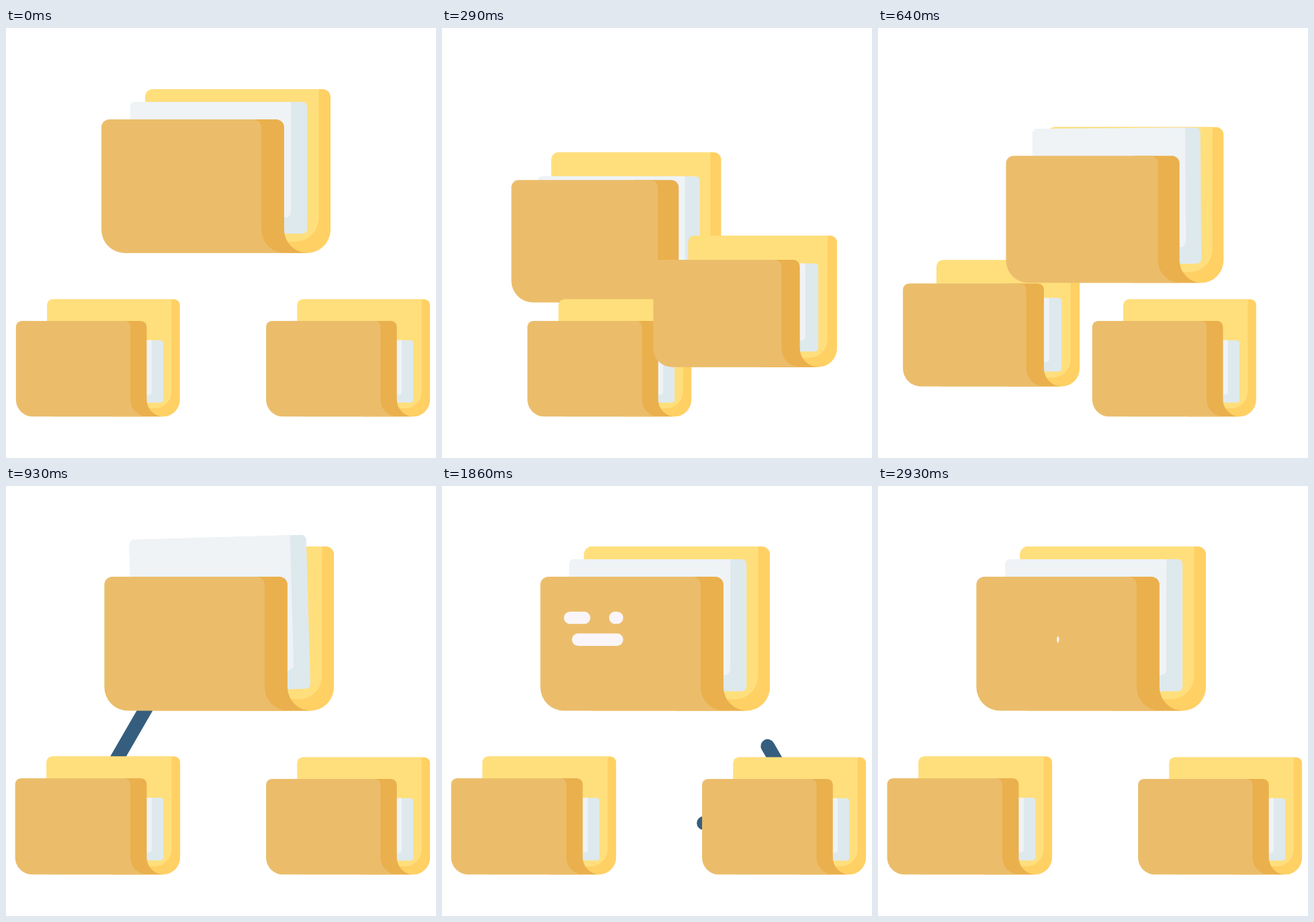
Recreate the animation shown at these times as an HTML page with a canvas. Size 640 by 640 pixels, loop 3 s.

```html
<!DOCTYPE html>
<html lang="en">
<head>
<meta charset="utf-8">
<title>Folders sharing files</title>
<style>
  html, body { margin: 0; height: 100%; overflow: hidden; background: #fff; }
  canvas { display: block; width: 640px; height: 640px; }
</style>
</head>
<body>
<canvas id="stage" width="640" height="640"></canvas>
<script>
const ctx = document.getElementById('stage').getContext('2d');
const LOOP = 3000;
const STEP = LOOP / 42;

const clamp = u => Math.min(1, Math.max(0, u));
const mix = (a, b, u) => a + (b - a) * u;
const smooth = u => u * u * (3 - 2 * u);
const eased = (t, start, duration) => smooth(clamp((t - start) / duration));

function box(color, x, y, right, bottom, radii) {
  ctx.fillStyle = color;
  ctx.beginPath();
  ctx.roundRect(x, y, right - x, bottom - y, radii);
  ctx.fill();
}

function shape(color, path) {
  ctx.fillStyle = color;
  ctx.fill(new Path2D(path));
}

// Folder artwork is 341 by 244 units; the sheet stretches from its bottom edge.
function drawFolder({ x, y, scale, stretch, tilt = 0 }) {
  ctx.save();
  ctx.translate(x, y);
  ctx.scale(scale, scale);
  box('#ffd064', 65, 0, 341, 244, [12, 12, 35, 12]);
  box('#ffdf7c', 65, 0, 323.5, 227, [12, 0, 35, 0]);

  ctx.save();
  ctx.translate(174.7, 215);
  ctx.rotate(-tilt * Math.PI / 180);
  ctx.scale(1, stretch);
  box('#dee9ee', -131.5, -196, 131.5, 0, 7);
  box('#eff3f6', -131.5, -196, 107.5, -24, [7, 0, 8, 7]);
  ctx.restore();

  shape('#eab04d', 'M226 45H260A12 12 0 0 1 272 57V209A35 35 0 0 0 307 244H200V45Z');
  shape('#ebbd6b', 'M12 45H226A12 12 0 0 1 238 57V209A35 35 0 0 0 273 244H35A35 35 0 0 1 0 209V57A12 12 0 0 1 12 45Z');
  ctx.restore();
}

// Pulses run clockwise round the triangle that joins the three folders.
const SIDE = 441;
const PULSE = 294;

function drawPulse(t, start) {
  const head = eased(t, start, 1000) * (3 * SIDE + PULSE);
  const tail = head - PULSE;
  if (head <= 0 || tail >= 3 * SIDE) return;
  ctx.setLineDash([PULSE, 5000]);
  ctx.lineDashOffset = -tail;
  ctx.beginPath();
  ctx.moveTo(109.6, 501.8);
  ctx.lineTo(330.3, 120);
  ctx.lineTo(551, 501.8);
  ctx.lineTo(109.6, 501.8);
  ctx.stroke();
}

// A long pill slides through a pill-shaped window.
function drawTextRow(t, y, pills) {
  ctx.save();
  ctx.beginPath();
  ctx.roundRect(181.5, y, 88.2, 18.6, 9.3);
  ctx.clip();
  for (const [start, duration] of pills) {
    const x = mix(71, 270, eased(t, start, duration));
    box('#faf5f9', x, y, x + 110, y + 18.6, 9.3);
  }
  ctx.restore();
}

function travel(from, to, p) {
  const pose = {};
  for (const key in from) pose[key] = mix(from[key], to[key], p);
  return pose;
}

const SMALL = 0.7155, SHORT = 0.662;
const START_TOP = { x: 142, y: 91, scale: 1, stretch: 1 };
const START_LEFT = { x: 14.8, y: 403.7, scale: SMALL, stretch: SHORT };
const START_RIGHT = { x: 387.1, y: 403.7, scale: SMALL, stretch: SHORT };
const END_TOP = { x: 146.4, y: 90, scale: 1.002, stretch: 1 };
const END_LEFT = { x: 13.6, y: 402.5, scale: 0.72, stretch: SHORT };

function popSheet(t) {
  const PEAK = 857;
  if (t < PEAK) return {
    stretch: mix(SHORT, 1.25, (t / PEAK) ** 1.12),
    tilt: 2.45 * clamp((t - 490) / (PEAK - 490)) ** 2
  };
  const rest = clamp(1 - (t - PEAK) / 357) ** 1.8;
  return { stretch: 1 + 0.25 * rest, tilt: 2.45 * rest };
}

function draw(t) {
  ctx.fillStyle = '#fff';
  ctx.fillRect(0, 0, 640, 640);

  ctx.strokeStyle = '#355e7e';
  ctx.lineWidth = 20.6;
  ctx.lineCap = ctx.lineJoin = 'round';
  for (const start of [690, 1259, 1781]) drawPulse(t, start);

  const u = clamp(t / 915);
  const p = smooth(u) + 0.475 * u * (1 - u) ** 2;
  drawFolder(travel(START_TOP, END_LEFT, p));
  drawFolder(travel(START_LEFT, START_RIGHT, p));
  drawFolder({ ...travel(START_RIGHT, END_TOP, p), ...popSheet(t) });

  drawTextRow(t, 186.9, [[917, 1180], [1450, 1420]]);
  drawTextRow(t, 219.3, [[1176, 1180], [1847, 1180]]);
}

function frame() {
  const t = performance.now() % LOOP;
  draw(Math.floor((t + 4) / STEP) % 42 * STEP);
  requestAnimationFrame(frame);
}
frame();
</script>
</body>
</html>
```
